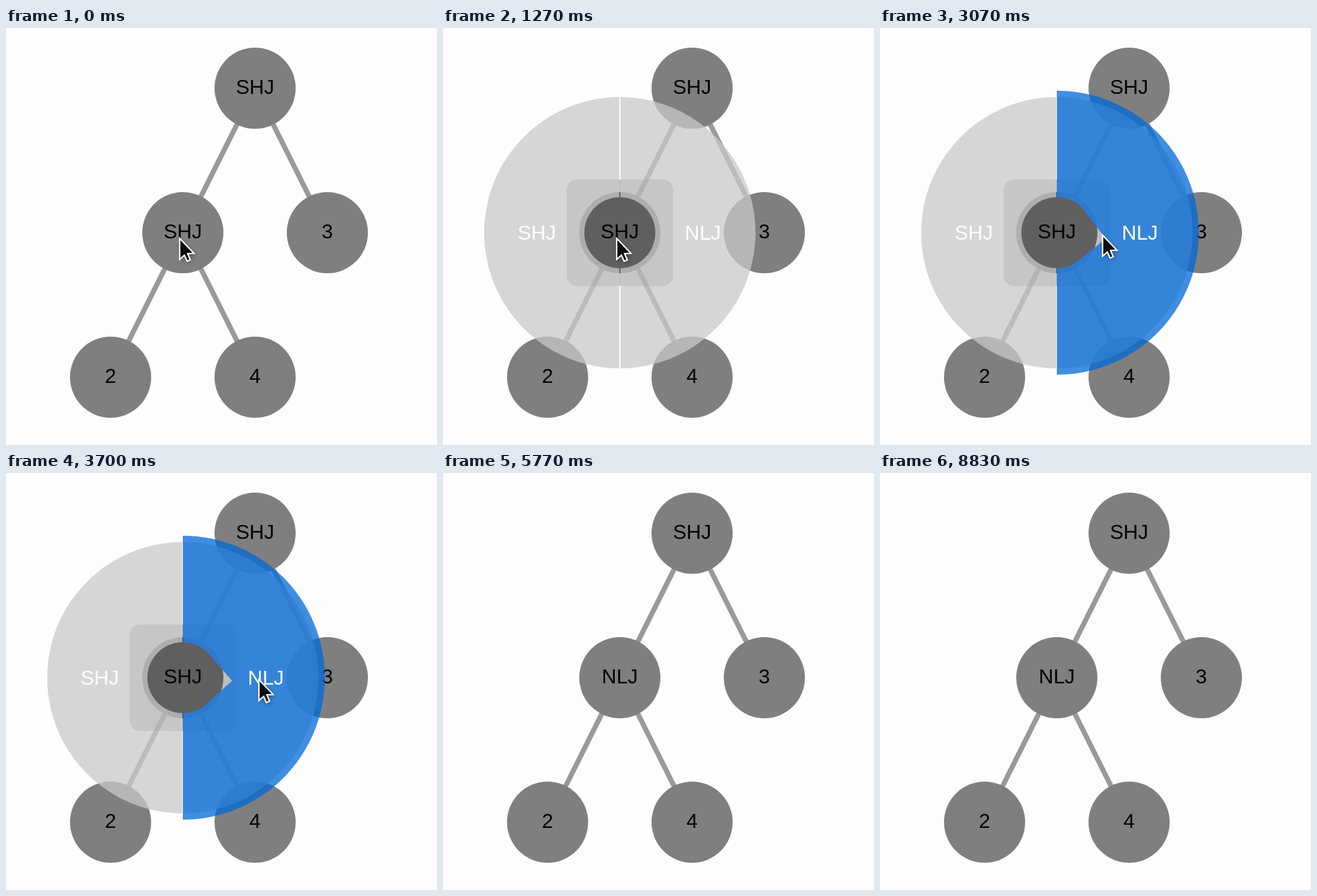
An HTML page with a canvas that plays this animation: 680x658 px, repeating every 8860 ms.

```html
<!DOCTYPE html>
<html lang="en">
<head>
<meta charset="utf-8">
<title>Tree with radial menu</title>
<style>
html, body { margin: 0; width: 100%; height: 100%; overflow: hidden; background: #fdfdfd; }
canvas { display: block; }
</style>
</head>
<body>
<canvas id="stage" width="680" height="658"></canvas>
<script>
const W = 680, H = 658, LOOP = 8860;
const OPEN = 1080, RELEASE = 3750, LEAVE = 5700;
const HUB = { x: 279, y: 323 };
const NODE_R = 64, MENU_R = 214, ACTIVE_R = 224, SPOT_R = 56, TIP = 48;
const FONT = '32px "Liberation Sans", Arial, sans-serif';

const ctx = document.getElementById('stage').getContext('2d');
const layer = document.createElement('canvas');
layer.width = W;
layer.height = H;
const menu = layer.getContext('2d');

const nodes = [
  { x: 393, y: 95, label: 'SHJ' },
  { ...HUB, hub: true },
  { x: 507, y: 323, label: '3' },
  { x: 165, y: 551, label: '2' },
  { x: 393, y: 551, label: '4' }
];
const edges = [[0, 1], [0, 2], [1, 3], [1, 4]];

// Pointer path: time, x, y
const path = [[0, 273, 330], [2730, 273, 330], [2890, 246, 333], [2920, 246, 333], [3070, 350, 325], [3300, 398, 324]];
const HOTSPOT = { x: 3, y: 7 };

function pointerAt(t) {
  const i = path.findIndex(p => p[0] > t);
  if (i < 0) {
    const [, x, y] = path[path.length - 1];
    return { x, y };
  }
  const [t0, x0, y0] = path[i - 1], [t1, x1, y1] = path[i];
  const k = (t - t0) / (t1 - t0);
  return { x: x0 + (x1 - x0) * k, y: y0 + (y1 - y0) * k };
}

function text(label, x, baseline, color) {
  ctx.font = FONT;
  ctx.textAlign = 'center';
  ctx.fillStyle = color;
  ctx.fillText(label, x, baseline);
}

function disc(c, x, y, r, color) {
  c.fillStyle = color;
  c.beginPath();
  c.arc(x, y, r, 0, Math.PI * 2);
  c.fill();
}

function drawTree(pressed, hubLabel) {
  ctx.fillStyle = '#fdfdfd';
  ctx.fillRect(0, 0, W, H);
  ctx.strokeStyle = '#999';
  ctx.lineWidth = 8;
  for (const [a, b] of edges) {
    ctx.beginPath();
    ctx.moveTo(nodes[a].x, nodes[a].y);
    ctx.lineTo(nodes[b].x, nodes[b].y);
    ctx.stroke();
  }
  for (const n of nodes) {
    disc(ctx, n.x, n.y, NODE_R, '#7f7f7f');
    text(n.hub ? hubLabel : n.label, n.x, n.y + 9, '#000');
  }
  if (pressed) {
    ctx.fillStyle = 'rgba(0,0,0,0.25)';
    ctx.beginPath();
    ctx.roundRect(HUB.x - 84, HUB.y - 84, 168, 168, 16);
    ctx.fill();
  }
}

// Erase the opening around the hub; its corner points at the pointer
function cutSpotlight(angle) {
  menu.globalCompositeOperation = 'destination-out';
  disc(menu, HUB.x, HUB.y, SPOT_R, '#000');
  if (angle !== null) {
    menu.translate(HUB.x, HUB.y);
    menu.rotate(angle);
    menu.translate(SPOT_R - TIP / 4, 0);
    menu.rotate(Math.PI / 4);
    menu.fillRect(-TIP / 2, -TIP / 2, TIP, TIP);
  }
}

function drawMenu(pointer) {
  const dx = pointer.x + HOTSPOT.x - HUB.x, dy = pointer.y + HOTSPOT.y - HUB.y;
  const chosen = Math.hypot(dx, dy) > SPOT_R;

  menu.save();
  menu.clearRect(0, 0, W, H);
  disc(menu, HUB.x, HUB.y, MENU_R, 'rgba(200,200,200,0.75)');
  menu.clearRect(HUB.x - 1, HUB.y - MENU_R, 2, MENU_R * 2);
  if (chosen) {
    menu.fillStyle = 'rgba(1,105,217,0.75)';
    menu.beginPath();
    menu.arc(HUB.x, HUB.y, ACTIVE_R, -Math.PI / 2, Math.PI / 2);
    menu.fill();
  }
  cutSpotlight(chosen ? Math.atan2(dy, dx) : null);
  menu.restore();

  ctx.drawImage(layer, 0, 0);
  text('SHJ', HUB.x - 131, HUB.y + 11, '#fff');
  text('NLJ', HUB.x + 131, HUB.y + 11, '#fff');
}

function drawPointer({ x, y }) {
  const arrow = [[1, 2], [1, 35], [8.5, 28.5], [12.8, 38], [17.8, 36], [13.6, 26], [23.5, 25.5]];
  ctx.save();
  ctx.translate(x, y);
  ctx.beginPath();
  arrow.forEach(([px, py]) => ctx.lineTo(px, py));
  ctx.closePath();
  ctx.lineWidth = 2.2;
  ctx.strokeStyle = '#fff';
  ctx.fillStyle = '#0c0c0c';
  ctx.shadowColor = 'rgba(0,0,0,0.4)';
  ctx.shadowBlur = 7;
  ctx.shadowOffsetX = 2;
  ctx.shadowOffsetY = 3;
  ctx.fill();
  ctx.shadowColor = 'transparent';
  ctx.stroke();
  ctx.restore();
}

function draw(t) {
  const open = t >= OPEN && t < RELEASE;
  const pointer = pointerAt(t);
  drawTree(open, t < RELEASE ? 'SHJ' : 'NLJ');
  if (open) drawMenu(pointer);
  if (t < LEAVE) drawPointer(pointer);
}

const start = performance.now();
function tick() {
  draw((performance.now() - start) % LOOP);
  requestAnimationFrame(tick);
}
tick();
</script>
</body>
</html>
```
